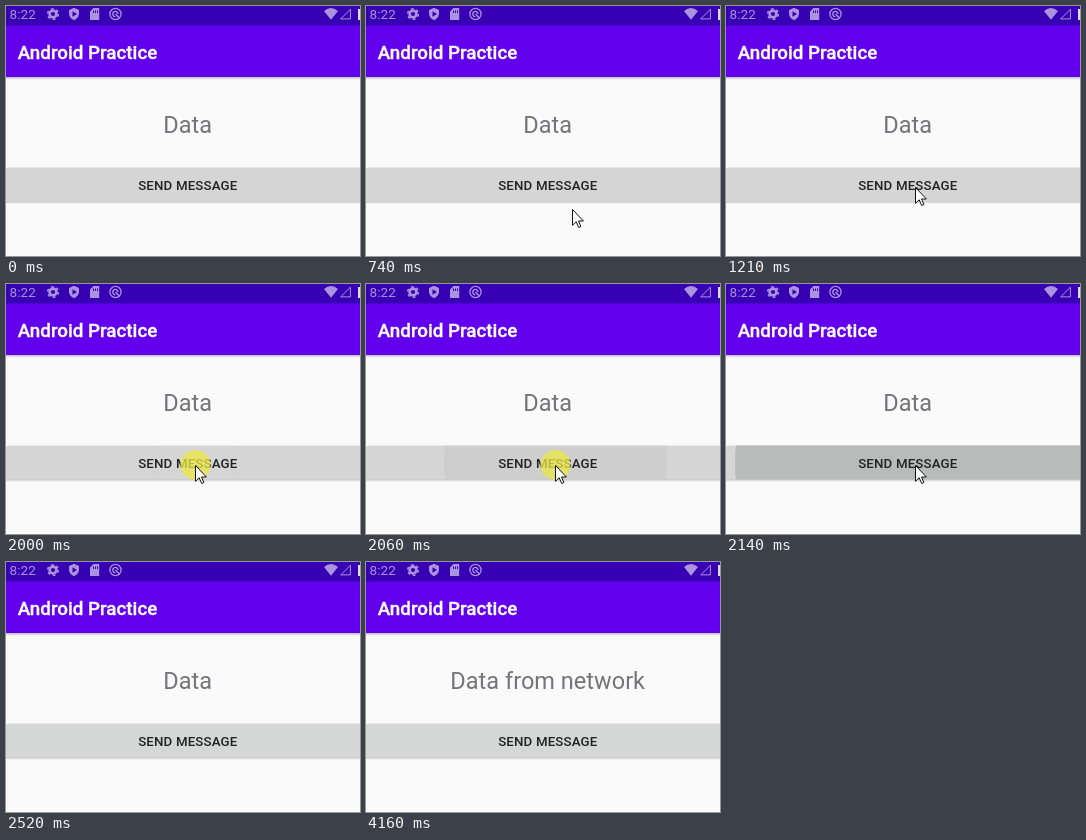
An HTML page for the animation above (5160 ms loop, 354x250 px).

```html
<!DOCTYPE html>
<html lang="en">
<head>
<meta charset="utf-8">
<title>Send message</title>
<style>
  html, body { margin: 0; width: 100%; height: 100%; overflow: hidden; background: #fafafa; }
  svg { display: block; width: 354px; height: 250px; font-family: Roboto, sans-serif; }
</style>
</head>
<body>
<svg viewBox="0 0 354 250">
  <defs>
    <clipPath id="buttonClip"><rect x="0" y="161.4" width="360" height="34.2" rx="2"/></clipPath>
    <linearGradient id="shade" x2="0" y2="1">
      <stop stop-color="#000" stop-opacity=".24"/>
      <stop offset="1" stop-color="#000" stop-opacity="0"/>
    </linearGradient>
  </defs>
  <rect width="354" height="250" fill="#fafafa"/>
  <rect y="71" width="354" height="3" fill="url(#shade)"/>
  <rect y="19" width="354" height="52" fill="#6200ee"/>
  <rect width="354" height="19.4" fill="#3700b3"/>

  <!-- status bar -->
  <g fill="#fff" opacity=".58">
    <text x="3.6" y="13" font-size="13.6">8:22</text>
    <g fill="none" stroke="#fff">
      <circle cx="47" cy="8" r="3.4" stroke-width="2.6"/>
      <circle cx="47" cy="8" r="5.3" stroke-width="1.6" stroke-dasharray="2.775"/>
      <circle cx="109.5" cy="8" r="5.6" stroke-width="1.3"/>
      <path d="M112 8A2.6 2.6 0 1 0 109.5 10.6M109.5 8L113.6 12.2" stroke-width="1.4"/>
    </g>
    <path fill-rule="evenodd" d="M68 1.8L73 4V8Q72.5 12.3 68 14.2 63.5 12.3 63 8V4ZM66.5 5.2V10.8L71 8Z"/>
    <path fill-rule="evenodd" d="M87.5 2H93.2V14H84V5.5ZM87 4.5V7H88V4.5ZM89 4.5V7H90V4.5ZM91 4.5V7H92V4.5Z"/>
    <path d="M318 5Q325 -.8 332 5L325 13.8Z"/>
    <path d="M344.4 3.2V12.9H334.7Z" fill="none" stroke="#fff"/>
  </g>
  <path d="M352 3H354V14H352Z" fill="#fff" opacity=".85"/>

  <text x="11.8" y="53" font-size="18.8" font-weight="500" fill="#fff" stroke="#fff" stroke-width=".35">Android Practice</text>
  <text id="label" x="181.7" y="127" font-size="23.55" text-anchor="middle" fill="#74747a">Data</text>

  <!-- button -->
  <rect y="195" width="354" height="3" fill="url(#shade)"/>
  <g clip-path="url(#buttonClip)">
    <rect id="face" y="161" width="360" height="35"/>
    <circle id="ripple" cx="189.5" cy="179" fill="#b9bbba"/>
  </g>
  <text x="181.8" y="184" font-size="13.3" font-weight="500" letter-spacing=".15" text-anchor="middle" fill="#222">SEND MESSAGE</text>
  <circle id="press" cx="189.5" cy="181" r="15" fill="#ebe746" opacity=".76"/>

  <path id="cursor" d="M.5 .5V16.3L4.2 12.8 6.7 18.5 8.9 17.5 6.5 12H11.4Z" fill="#fff" stroke="#111"/>
</svg>
<script>
const LOOP = 5160, STEP = 80;
const ENTER = 740, NUDGE = 1130, PRESS = 2000, RELEASE = 2140, LEAVE = 2220, GONE = 2520, REPLY = 4160;
const [label, face, ripple, press, cursor] =
  ['label', 'face', 'ripple', 'press', 'cursor'].map(id => document.getElementById(id));

const clamp = v => Math.min(1, Math.max(0, v));
const show = (node, on) => node.setAttribute('visibility', on ? 'visible' : 'hidden');
const stepped = (t, from, span) => clamp(Math.floor((t - from) / STEP) * STEP / span);

function drawCursor(t) {
  const enter = stepped(t, ENTER, 240);
  const nudge = stepped(t, NUDGE - STEP, 2 * STEP);
  const leave = stepped(t, LEAVE, 240);
  const x = 206 - 17 * enter + 10 * leave;
  const y = 203 - 36 * enter + 14 * nudge + 43 * leave;
  show(cursor, t >= ENTER && t < GONE);
  cursor.setAttribute('transform', `translate(${Math.round(x)} ${Math.round(y)})`);
}

function drawButton(t) {
  const grow = stepped(t, RELEASE - 3 * STEP, 3 * STEP);
  const fade = stepped(t, LEAVE, GONE - LEAVE);
  show(ripple, t >= PRESS && t < GONE);
  ripple.setAttribute('r', t < LEAVE ? 207 * grow - 26.5 : 240);
  ripple.setAttribute('opacity', grow ** 3 * (1 - fade));
  show(press, t >= PRESS && t < RELEASE);
  face.setAttribute('fill', t < RELEASE ? '#d5d5d5' : '#d5d7d6');
}

function draw(t) {
  drawCursor(t);
  drawButton(t);
  label.textContent = t < REPLY ? 'Data' : 'Data from network';
}

const start = performance.now();
function tick() {
  draw((performance.now() - start) % LOOP);
  requestAnimationFrame(tick);
}
draw(0);
requestAnimationFrame(tick);
</script>
</body>
</html>
```
